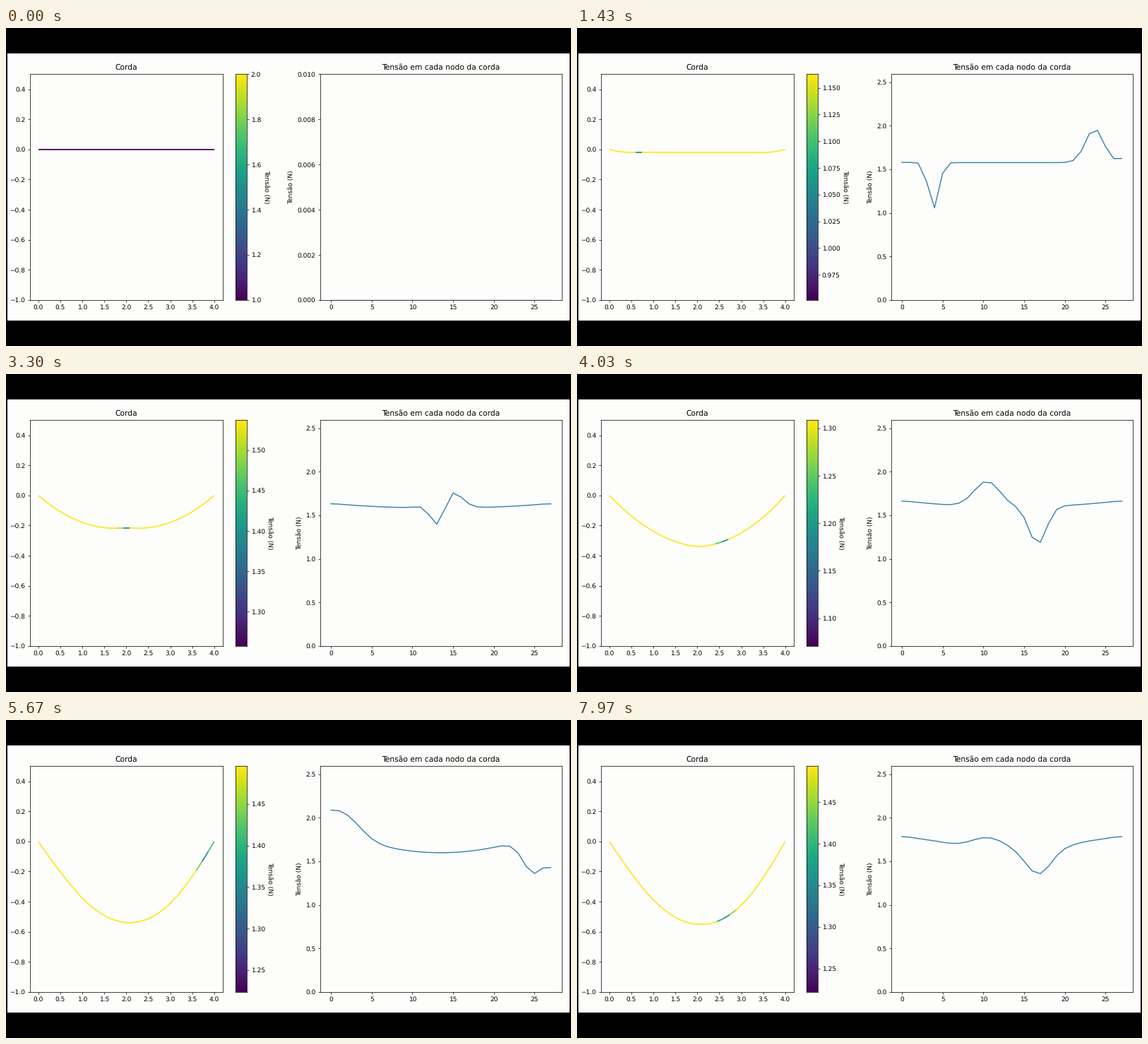
Animation of 800 by 450 pixels, one loop 8 s. Source, as a matplotlib script:

```python
import numpy as np
import matplotlib.pyplot as plt
from matplotlib.animation import FuncAnimation
from matplotlib.collections import LineCollection
from matplotlib.patches import Rectangle

W, H, DPI = 800, 450, 64
FRAMES, LOOP = 240, 8000
HOLD = 16                    # still frames before the rope is released
PAPER = "#fdfdfb"

plt.rcParams.update({
    "font.family": "DejaVu Sans",
    "font.size": 10.12,
    "text.hinting": "none",
    "axes.linewidth": 0.82,
    "axes.labelpad": 4.07,
    "axes.titlepad": 7,
    "axes.facecolor": PAPER,
})

# Rope: a taut string released under gravity
N, LENGTH = 28, 4.0
SPEED, GRAVITY, RELEASE = 0.63, 0.058, 0.56
rest_x = np.linspace(0, LENGTH, N)
nodes = np.arange(N)
SPAN = N - 2                 # distance between the two reflecting ends


def sag(x):
    """Static shape, extended as an odd function of period 2 * LENGTH."""
    x = (x + LENGTH) % (2 * LENGTH) - LENGTH
    return -GRAVITY / (2 * SPEED ** 2) * x * (LENGTH - np.abs(x))


def height(s):
    """Travelling-wave solution of the falling string after s seconds."""
    d = SPEED * s
    return sag(rest_x) - (sag(rest_x + d) + sag(rest_x - d)) / 2


def pulse(s, start, speed, size, fade, width, spread):
    """Pulse that fades, widens and is mirrored at both ends."""
    pos = start + speed * s
    var = width + spread * s
    total = 0
    for lane in (nodes - 0.5, 2 * SPAN - nodes + 0.5):
        d = (lane - pos + SPAN) % (2 * SPAN) - SPAN
        total = total + np.exp(-d ** 2 / (2 * var))
    return size * (1 - s / fade) * total


def tension(s):
    slope = np.gradient(height(s), rest_x)
    base = (1.572 + 0.005 * s) * np.hypot(1, slope)
    dip = pulse(s, -0.75, 4.92, -0.56, 14.5, 0.2, 0.27)
    bump = pulse(s, 24.6, 5.07, 0.42, 11.5, 0.8, 0.5)
    return base + dip + bump


def rope(s):
    drift = 0.08 * np.clip((s - 2.7) / 1.5, 0, 1)
    x = rest_x + drift * rest_x * (LENGTH - rest_x) / 4
    return np.column_stack([x, height(s)])


fig = plt.figure(figsize=(W / DPI, H / DPI), dpi=DPI, facecolor="black")
fig.add_artist(Rectangle((2 / W, 36 / H), 796 / W, 378 / H, color=PAPER, lw=0,
                         transform=fig.transFigure, zorder=-5))


def panel(left, width, top=65.4, tall=319.5):
    return fig.add_axes([left / W, 1 - (top + tall) / H, width / W, tall / H])


ax = panel(33.5, 273.7)
ax.set_title("Corda")
ax.set_xlim(-0.2, 4.2)
ax.set_ylim(-1, 0.5)
string = LineCollection([], cmap="viridis", linewidths=2.0)
ax.add_collection(string, autolim=False)

bar = panel(324.5, 16)
bar.imshow(np.linspace(0, 1, 256)[:, None], cmap="viridis", origin="lower",
           extent=(0, 1, 0, 1), transform=bar.transAxes, aspect="auto")
bar.set_xlim(0, 1)
bar.set_xticks([])
bar.yaxis.tick_right()
bar.yaxis.set_label_position("right")
bar.set_ylabel("Tensão (N)", rotation=270, labelpad=12)

plot = panel(444.5, 342.5)
plot.set_title("Tensão em cada nodo da corda")
plot.set_ylabel("Tensão (N)")
plot.set_xlim(-1.35, 28.35)
curve, = plot.plot(nodes, np.zeros(N), color="#3a82a6", lw=1.6)


def draw(i):
    s = max(0, i * LOOP / FRAMES / 1000 - RELEASE)
    if i < HOLD:
        force, low, high, top = np.zeros(N), 1, 2, 0.01
    else:
        force = tension(s)
        low, high, top = 0.9 * force.min(), 1.1 * force.min(), 2.59
    pts = rope(s)
    string.set_segments(np.stack([pts[:-1], pts[1:]], axis=1))
    string.set_array(force[:-1])
    string.set_clim(low, high)
    bar.set_ylim(low, high)
    plot.set_ylim(0, top)
    curve.set_ydata(force)
    return string, curve


anim = FuncAnimation(fig, draw, frames=FRAMES, interval=LOOP / FRAMES,
                     init_func=lambda: draw(0), repeat=True, repeat_delay=0, blit=False)
plt.show()
```
